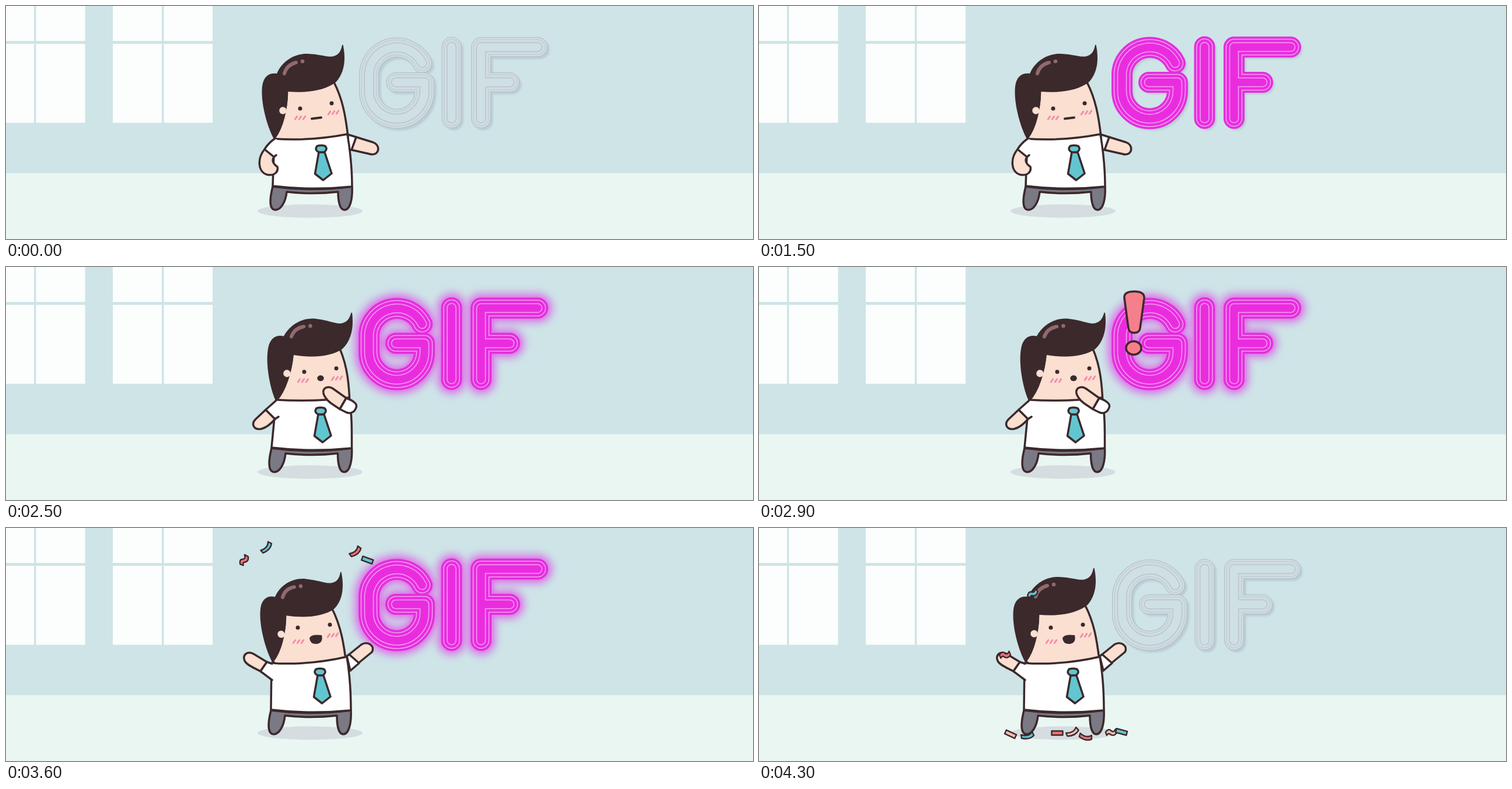
An HTML page that plays this animation: 1280 px wide and 400 px high, repeating every 4400 ms.

```html
<!DOCTYPE html>
<html lang="en">
<head>
<meta charset="utf-8">
<title>Neon sign</title>
<style>
html, body { margin: 0; height: 100%; overflow: hidden; background: #cee4e7; }
svg { display: block; width: 100vw; height: 100vh; }
.ink { stroke: #3b292c; stroke-width: 3.5; stroke-linejoin: round; stroke-linecap: round; }
.tube { fill: none; stroke-linejoin: round; stroke-linecap: round; }
</style>
</head>
<body>
<svg id="stage" viewBox="0 0 1280 400" xmlns="http://www.w3.org/2000/svg"></svg>
<script>
const INK = '#3b292c', SKIN = '#fbdfd1', CYAN = '#62c6d0', RED = '#f0707c', PINK = '#f5bcb0';
const LOOP = 4400, STEP = 100;

const path = (d, fill = 'none', cls = 'ink') => `<path d="${d}" fill="${fill}" class="${cls}"/>`;
const dot = (x, y, r, fill = INK) => `<circle cx="${x}" cy="${y}" r="${r}" fill="${fill}"/>`;
const group = (id, content, attrs = '') => `<g id="${id}" ${attrs}>${content}</g>`;

// Room
const panes = [[0, 48], [51.5, 84], [183, 84], [270.5, 83.5]].map(([x, w]) =>
  `<path d="M${x},0h${w}v60h${-w}zM${x},65h${w}v135.500h${-w}z" fill="#fbfefd"/>`).join('');
const room = `<rect width="1280" height="400" fill="#cee4e7"/>${panes}
  <rect y="287" width="1280" height="113" fill="#eaf6f2"/>`;

// Sign: every letter is one centre line, stroked several times
const letters = {
  G: 'M713,98A48,48 0 0 0 622,115V146A47.500,47.500 0 0 0 717,146V131H668',
  I: 'M763.5,70V193',
  F: 'M911,70.500H814V193M814,131H863'
};
const tubes = (d, list) => list.map(([w, c]) =>
  `<path class="tube" d="${d}" stroke="${c}" stroke-width="${w}"/>`).join('');
const all = Object.values(letters).join('');
const offTube = [[34, '#b3c1c8'], [31.5, '#d3dfe3'], [27, '#b9c7cd'], [25, '#cfdce0'], [16.5, '#b4c2c9'], [14, '#cee0e4']];
const litTube = [[36, '#e32fdd'], [28.5, '#f2a0f1'], [25.5, '#ea2cdf'], [16.5, '#f2a0f1'], [13.5, '#ea2cdf']];
const sign =
  `<g transform="translate(4 4)" filter="url(#soft)" opacity=".7">${tubes(all, [[33, '#b2c3ca']])}</g>` +
  group('glow', `<g filter="url(#wide)" opacity=".75">${tubes(all, [[62, '#cfb6e8']])}</g>
    <g filter="url(#near)" opacity=".9">${tubes(all, [[44, '#e06ce6']])}</g>`) +
  tubes(all, offTube) +
  Object.keys(letters).map(k => group('lit' + k, tubes(letters[k], litTube))).join('');

// Character parts
const head =
  path('M460,227C474,208 481,180 482,140L562,131C577,160 582,190 586,224V238H475Z', SKIN) +
  path('M459,228C447,206 436,165 439,138C441,121 451,114 464,116C473,95 494,81 517,82C541,83 552,89 562,86' +
    'C571,83 574,77 576,67C577,66 578,67 578,69C582,90 581,113 566,130C548,145 515,150 483,147C484,180 472,210 459,228Z', INK, '') +
  dot(474.5, 179.5, 6.2, SKIN) +
  '<path d="M477,116Q481,101 497,97" fill="none" stroke="#906a6e" stroke-width="6" stroke-linecap="round"/>' +
  dot(508, 95, 3.3, '#906a6e');

const cheek = (x, y, slope) => [-7, 0, 7].map(i =>
  `<path d="M${x + i - 1.700},${y + 2.500 - i * slope}l3.400,-5" stroke="#f58cab" stroke-width="3" stroke-linecap="round"/>`).join('');

const tie =
  path('M536,251L529.500,288L543.500,299L558,287.500L546,251Z', CYAN) +
  path('M533,240.500Q540,238 547,240.500Q552,246 545,251H536Q528,247 533,240.500Z', CYAN);

// l, r: hips; y: belt; foot: soles; neck: collar ends
function body({ l, r, y, foot, neck: [x1, y1, x2, y2] }) {
  const mid = (l + r) / 2;
  const pants = `M${l},${y}Q${mid},${y + 9} ${r},${y}C${r + 1},${y + 20} ${r - 3},${foot} ${r - 13},${foot}` +
    `C${r - 21},${foot} ${r - 24},${foot - 15} ${r - 24},${y + 9}Q${mid},${y + 14} ${l + 24},${y + 9}` +
    `C${l + 22},${foot - 12} ${l + 13},${foot} ${l + 5},${foot}C${l - 7},${foot} ${l - 5},${y + 20} ${l},${y}Z`;
  const shirt = `M${x1},${y1}Q${(x1 + x2) / 2},${y1 + 4} ${x2},${y2}C${x2 + 5},${y2 + 30} ${r},${y - 30} ${r},${y}` +
    `Q${mid},${y + 7} ${l},${y - 1}Z`;
  return path(pants, '#7a7984') + path(shirt, '#fff');
}

const hipArm =
  path('M443,246C430,262 431,287 450,290C461,291 467,284 465,276C458,272 454,263 463,256L460,250Z', SKIN, '') +
  path('M460,228L443,246L459,259L472,250V232Z', '#fff', '') +
  path('M460,228Q449,236 443,246C430,262 431,287 450,290C461,291 467,284 465,276C456,270 454,262 463,256M443,246L459,259');

const flatMouth = '<path d="M524,193.500L540,191.500" stroke="#3b292c" stroke-width="4" stroke-linecap="round"/>';

const question =
  path('M607,84C604,62 628,48 652,49C678,51 692,70 688,88C684,107 664,111 661,124C660,131 655,132 648,131' +
    'C640,131 637,130 640,119C643,104 659,99 657,86C654,76 639,77 635,87C632,96 630,99 621,99C612,99 608,92 607,84Z', '#f5808c') +
  `<circle cx="653" cy="152" r="15" fill="#f5808c" class="ink"/>`;
const bang =
  path('M626,53Q625,42 643,42Q661,42 660,54L653,105Q652,113 643,113Q634,113 633,105Z', '#f5808c') +
  `<ellipse cx="642" cy="139" rx="13" ry="11.500" fill="#f5808c" class="ink"/>`;

const LEAN = 'translate(3 2) rotate(4.5 460 230)';
const poses = {
  A: {
    l: 457, r: 593, y: 310, foot: 350, neck: [460, 228, 585, 220], tie: '0 0',
    face: [504, 176, 558, 167, 504, 192, 561, 183], mouth: flatMouth,
    back: path('M600,225L629,234C639,238 640,248 634,253Q629,256 623,254L592,247Z', SKIN) +
      path('M584,220L600,225L592,247H586Z', '#fff'),
    front: hipArm
  },
  B: {
    turn: 'rotate(-3.5 460 230)', l: 457, r: 595, y: 310, foot: 350, neck: [460, 228, 588, 219], tie: '1 1',
    face: [503, 176, 559, 165, 502, 192, 563, 183], mouth: flatMouth,
    back: path('M592,224L611,216C622,212 631,222 626,231L597,246Z', SKIN) +
      path('M586,220L594,223L599,245L589,248Z', '#fff'),
    front: hipArm, extra: question
  },
  C: {
    turn: LEAN, l: 455, r: 592.5, y: 311, foot: 352, neck: [463, 228, 588, 224], tie: '-1 2',
    face: [511, 180, 566, 174, 509, 195, 567, 191],
    mouth: `<ellipse cx="539" cy="191" rx="5.700" ry="5" fill="${INK}"/>`,
    back: '',
    front: path('M445,245L428,261C419,270 425,280 437,278C446,276 455,268 461,261Z', SKIN) +
      path('M463,229L445,245L461,261L467,257L474,232Z', '#fff', '') + path('M463,229L445,245L461,261L467,257') +
      path('M583,225L562,210C554,204 546,206 544,212C542,219 550,229 557,234L572,244Z', SKIN) +
      path('M583,225C594,229 603,235 600,241C597,251 588,253 580,248L572,244Z', '#fff')
  },
  D: {
    turn: 'translate(-2 -15) ' + LEAN, l: 453, r: 592, y: 311, foot: 352, neck: [461, 214, 587, 211], tie: '-17 -7',
    face: [509, 166, 565, 160, 508, 181, 566, 177],
    mouth: path('M531,176Q538,172 546,176Q546,186 538,186Q531,185 531,176Z', INK, ''),
    back: '',
    front: path('M458,230L446,252C440,264 448,273 457,270Q462,268 477,242Z', SKIN) +
      path('M462,216L458,230L476,242L483,236L478,219Z', '#fff', '') + path('M462,222L458,230L476,242L483,236') +
      path('M575,212L550,206C538,205 532,214 538,221C544,229 558,232 571,236Z', SKIN) +
      path('M575,212L586,211L588,238L571,236Z', '#fff', '') + path('M584,214L575,212L571,236L576,238')
  },
  E: {
    l: 454, r: 591, y: 313, foot: 354, neck: [455, 232, 584, 221], tie: '-2 2',
    face: [500, 171, 555, 166, 501, 195, 560, 184],
    mouth: path('M520,189Q523,182 541,184Q544,197 533,199Q521,200 520,189Z', INK, ''),
    back: path('M588,217L609,200C620,193 633,203 627,213L605,231L590,244Z', SKIN) +
      path('M584,220L588,217L605,232L590,245Z', '#fff'),
    front: path('M447,230L424,216C412,210 405,219 409,228C412,235 425,240 436,246Z', SKIN) +
      path('M456,233L447,230L436,246L456,261L466,255V235Z', '#fff', '') + path('M456,233L447,230L436,246L456,261')
  }
};

function figure(name) {
  const p = poses[name], [x1, y1, x2, y2, cx1, cy1, cx2, cy2] = p.face;
  return group('pose' + name,
    p.back + group('head' + name, head, `transform="${p.turn || ''}"`) +
    dot(x1, y1, 3.5) + dot(x2, y2, 3.5) + cheek(cx1, cy1, 0) + cheek(cx2, cy2, .1) + p.mouth +
    body(p) + `<g transform="translate(${p.tie})">${tie}</g>` + p.front + (p.extra || ''));
}

// Confetti: shape, colour, then x, y, angle in the air and at rest
const shapes = {
  strip: 'M-9.500,-3.500H9.500V3.500H-9.500Z',
  curl: 'M-11,-1Q2,3 8,-6L11,0Q4,8 -10,5Z',
  wave: 'M-9,2Q-5,-6 0,-2Q5,1 7,-6L10,0Q6,8 -1,4Q-4,2 -6,7Z'
};
const confetti = [
  ['strip', PINK, 421, 145, 75, 431, 354, 25],
  ['wave', RED, 413, 205, -20, 421, 217, 5],
  ['curl', CYAN, 452, 183, -20, 460, 356, 0],
  ['wave', CYAN, 463, 103, -10, 468, 112, -20],
  ['curl', PINK, 544, 93, 0, 537, 350, -15],
  ['strip', RED, 525, 134, -65, 511, 352, 0],
  ['wave', PINK, 603, 142, 45, 603, 350, 10],
  ['curl', RED, 582, 190, -5, 560, 358, 25],
  ['strip', CYAN, 620, 205, -85, 621, 350, 15]
];

document.getElementById('stage').innerHTML = `<defs>${[['soft', 1.5], ['near', 5], ['wide', 5]].map(([id, s]) =>
  `<filter id="${id}" filterUnits="userSpaceOnUse" x="560" y="0" width="420" height="260"><feGaussianBlur stdDeviation="${s}"/></filter>`).join('')}</defs>` +
  room + sign + '<ellipse cx="521" cy="352" rx="90" ry="11.500" fill="#d5dde0"/>' +
  Object.keys(poses).map(figure).join('') + group('bang', bang) +
  group('confetti', confetti.map(c => `<path d="${shapes[c[0]]}" fill="${c[1]}" class="ink" style="stroke-width:2.4"/>`).join(''));

const el = id => document.getElementById(id);
const fade = (id, a) => {
  el(id).style.opacity = a;
  el(id).style.display = a ? '' : 'none';
};

function draw(time) {
  const t = Math.floor(time % LOOP / STEP) * STEP;
  const ramp = (start, steps = 3) => Math.max(0, Math.min(1, (t - start + STEP) / (steps * STEP)));
  const on = t < 4300 ? 1 : 0;

  fade('litG', on * ramp(1000) ** 1.3);
  fade('litI', on * ramp(1200) ** 1.3);
  fade('litF', on * ramp(1300) ** 1.3);
  fade('glow', on * ramp(1600));

  const b = ramp(1900), c = ramp(2300), d = ramp(3100, 4), e = ramp(3500, 2);
  fade('poseA', 1 - b);
  fade('poseB', b * (1 - c));
  fade('poseC', c * (1 - d));
  fade('bang', ramp(2700) * (1 - d));
  fade('poseD', d * (1 - e));
  fade('poseE', e);
  el('headE').setAttribute('transform', on
    ? 'translate(-3 2) translate(460 230) skewY(3.4) translate(-460 -230)'
    : 'translate(-3 2)');

  fade('confetti', t >= 3600 ? 1 : 0);
  const k = Math.min(1, (t - 3900) / 400);
  confetti.forEach(([, , x0, y0, r0, x1, y1, r1], i) => {
    const speed = Math.max(.5, (y1 - y0) / 400);
    const y = Math.min(y1, y0 + speed * (t - 3900));
    el('confetti').children[i].setAttribute('transform',
      `translate(${x0 + (x1 - x0) * k} ${y}) rotate(${r0 + (r1 - r0) * k})`);
  });
}

const begin = performance.now();
function tick() {
  draw(performance.now() - begin);
  requestAnimationFrame(tick);
}
tick();
</script>
</body>
</html>
```
